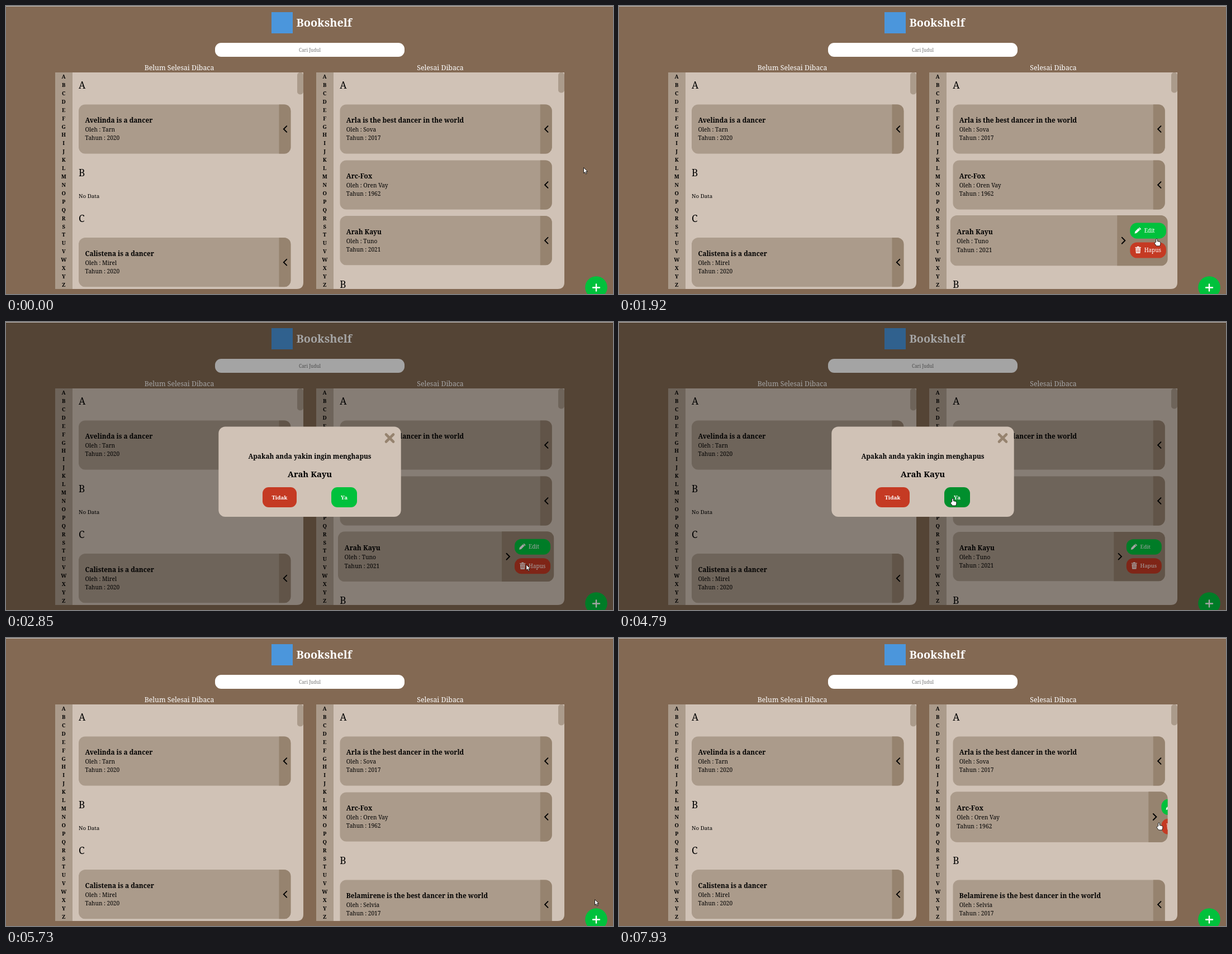
These frames come from a looping animation (1086x516 px, 8000 ms). An HTML page:

```html
<!DOCTYPE html>
<html lang="id">
<head>
<meta charset="utf-8">
<title>Bookshelf</title>
<style>
  html, body { margin: 0; width: 100%; height: 100%; overflow: hidden; background: #836953; }
  svg { display: block; width: 100%; height: 100%; font-family: "Noto Serif", serif; }
</style>
</head>
<body>
<svg id="stage" viewBox="0 0 1086 516"></svg>
<script>
const LOOP = 8000, START = 450, STEP = 135;
const C = {
  wall: '#836953', panel: '#d0c2b6', card: '#ab9b8b', flap: '#96836f',
  green: '#00c13c', greenDark: '#008f2d', red: '#c53a23', redDark: '#9a2c1a'
};

// Where the pointer goes, one eased move after another.
const HOME = { x: 1033, y: 289 };
const MOVES = [
  { from: 400, to: 1120, x: 957, y: 405 },
  { from: 1120, to: 1390, x: 963, y: 416 },
  { from: 1700, to: 2490, x: 941, y: 438 },
  { from: 2650, to: 3550, x: 597, y: 316 },
  { from: 4900, to: 5715, x: 1053, y: 468 },
  { from: 5730, to: 6120, x: 1058, y: 530 },
  { from: 6880, to: 6890, x: 966, y: 427 },
  { from: 6890, to: 7420, x: 966, y: 331 }
];

const within = (t, from, to = LOOP) => t >= from && t < to;
const ease = k => (k = Math.min(1, Math.max(0, k)), k * k * (3 - 2 * k));
const transition = (t, on, off = Infinity, length = 300) =>
  ease((t - on) / length) - ease((t - off) / length);

// Motion is shown in held steps, like a screen recording.
const held = t => Math.max(0, START + Math.floor((t - START) / STEP) * STEP);

const box = (x, y, w, h, fill, r = 0) =>
  `<rect x="${x}" y="${y}" width="${w}" height="${h}" rx="${r}" fill="${fill}"/>`;
const line = (d, color, width) =>
  `<path d="${d}" fill="none" stroke="${color}" stroke-width="${width}" stroke-linecap="round"/>`;
const text = (s, x, y, size, { fill = '#000', bold = false, mid = false } = {}) =>
  `<text x="${x}" y="${y}" font-size="${size}" fill="${fill}"` +
  `${bold ? ' font-weight="700"' : ''}${mid ? ' text-anchor="middle"' : ''}>${s}</text>`;

const DEFS = `<defs>
  <clipPath id="cardClip"><rect width="379.5" height="88.5" rx="12"/></clipPath>
  <clipPath id="panelClip"><rect x="88" y="119" width="911" height="388"/></clipPath>
</defs>`;

function actions(hapusHover) {
  const red = hapusHover ? C.redDark : C.red;
  const pencil = '<path d="M0 11l.8-3.6 5.8-5.8 2.8 2.8-5.8 5.8zM7.3.9q1-1 2 0l1.5 1.5q.7.9-.1 1.7l-.5.5z" fill="#fff"/>';
  const trash = '<path d="M0 1.3h3l.6-1.3h2.8l.6 1.3h3v1.3h-10zM.8 3.4h8.4l-.6 8.6h-7.2z" fill="#fff"/>' +
    line('M3 5v5.3M5 5v5.3M7 5v5.3', red, .8);
  return box(0, 13.3, 63, 27.5, C.green, 12) + box(0, 47.3, 63, 27.5, red, 12) +
    `<g transform="translate(8 21)">${pencil}</g><g transform="translate(9 54.5)">${trash}</g>` +
    text('Edit', 24.7, 30.3, 9.7, { fill: '#fff' }) + text('Hapus', 24.7, 64.3, 9.7, { fill: '#fff' });
}

function card(x, y, [title, author, year], { hover = 0, open = 0, hapusHover = false } = {}) {
  const scale = 1 + .025 * hover, flap = 358.5 - 70.5 * open, dir = open ? -1 : 1;
  return `<g transform="translate(${x + 189.75} ${y + 44.25}) scale(${scale}) translate(-189.75 -44.25)" clip-path="url(#cardClip)">` +
    box(0, 0, 379.5, 88.5, C.card) + box(flap, 0, 380, 88.5, C.flap) +
    text(title, 11.5, 33, 11.8, { bold: true }) +
    text('Oleh : ' + author, 11.5, 48.8, 10.1) + text('Tahun : ' + year, 11.5, 64.2, 10.1) +
    line(`M${flap + 11 + 2.7 * dir} 38.8l${-5.4 * dir} 5.4l${5.4 * dir} 5.4`, '#000', 1.9) +
    (open ? `<g transform="translate(${flap + 22.5} 0)">${actions(hapusHover)}</g>` : '') + '</g>';
}

function panel(x, heading, thumb) {
  const letters = [...'ABCDEFGHIJKLMNOPQRSTUVWXYZ'];
  return `<path d="M${x} 119h444v376q0 12-12 12h-432z" fill="${C.panel}"/>` +
    box(x, 119, 31, 388, C.card) + box(x + 433, 119, 11, thumb, C.card, 5) +
    letters.map((s, i) => text(s, x + 15.2, 130 + i * 14.92, 9.5, { bold: true, mid: true })).join('') +
    text(heading, x + 222, 115.3, 12.3, { fill: '#fff', mid: true });
}

const section = (letter, x, baseline) => text(letter, x, baseline, 17.3);

function books(t) {
  const deleted = t >= 4910, m = held(t);
  const left = 130, right = 597.3;
  const first = {
    hover: transition(m, 750, 900) + transition(m, 7060),
    open: transition(m, 7755, Infinity, 450)
  };
  const second = {
    hover: transition(m, 1060, 2640),
    open: transition(m, 1410, Infinity, 450),
    hapusHover: within(t, 2220, 2850)
  };
  return panel(88, 'Belum Selesai Dibaca', 39.5) + panel(555, 'Selesai Dibaca', deleted ? 37.5 : 36.5) +
    '<g clip-path="url(#panelClip)">' +
    section('A', left, 148.3) + card(left, 176.3, ['Avelinda is a dancer', 'Tarn', 2020]) +
    section('B', left, 305.3) + text('No Data', left, 343.5, 9.8) +
    section('C', left, 387) + card(left, 415, ['Calistena is a dancer', 'Mirel', 2020]) +
    section('A', right, 148.3) + card(right, 176.3, ['Arla is the best dancer in the world', 'Sova', 2017]) +
    card(right, 276.3, ['Arc-Fox', 'Oren Vay', 1962], first) +
    (deleted
      ? section('B', right, 405) + card(right, 433.3, ['Belamirene is the best dancer in the world', 'Selvia', 2017])
      : card(right, 376, ['Arah Kayu', 'Tuno', 2021], second) + section('B', right, 504.5)) +
    '</g>';
}

function dialog(t) {
  const white = { fill: '#fff', bold: true, mid: true };
  return box(0, 0, 1086, 516, 'rgba(0,0,0,.355)') + box(380.3, 187.5, 326.4, 161.5, C.panel, 12) +
    line('M680 201.5l13 13m0-13l-13 13', C.flap, 4.6) +
    text('Apakah anda yakin ingin menghapus', 543.5, 244.5, 11.75, { bold: true, mid: true }) +
    text('Arah Kayu', 543.5, 277.5, 14.9, { bold: true, mid: true }) +
    box(459, 296, 61, 36, C.red, 11) + text('Tidak', 489.5, 317.5, 9.7, white) +
    box(582, 296, 46, 36, within(t, 3700) ? C.greenDark : C.green, 11) + text('Ya', 605, 317.5, 9.7, white);
}

function pointer(t) {
  const { x, y } = MOVES.reduce((p, move) => {
    const k = ease((held(t) - move.from) / (move.to - move.from));
    return { x: p.x + (move.x - p.x) * k, y: p.y + (move.y - p.y) * k };
  }, HOME);
  const hand = within(t, 1250, 2730) || within(t, 3550, 4910) || within(t, 5870, 6900) || within(t, 7160);
  const shape = hand
    ? 'M-1.3 6V.8Q0-.8 1.3.8V4.6l4 .8q1.5.3 1.5 2V10L5.6 13H-.5L-3.8 8.6q-.5-1.8 1-1.5z'
    : 'M.5.5V10.5l2.3-2.1 1.6 3.6 1.7-.8-1.6-3.5h3.1z';
  return `<path d="${shape}" transform="translate(${x} ${y})" fill="#fff" stroke="#111" stroke-width=".9" stroke-linejoin="round"/>`;
}

function scene(t) {
  return DEFS + box(0, 0, 1086, 516, C.wall) +
    box(475, 11, 38, 38, '#4b96dc') +
    text('Bookshelf', 519.5, 36.5, 19.8, { fill: '#fff', bold: true }) +
    box(374, 66, 339, 25, '#fff', 11) +
    text('Cari Judul', 543.5, 81.5, 8.2, { fill: '#757575', mid: true }) +
    books(t) +
    `<circle cx="1056" cy="504" r="19.8" fill="${within(t, 5870, 6390) ? C.greenDark : C.green}"/>` +
    line('M1050 504.5h12m-6-6v12', '#fff', 2.4) +
    (within(t, 2850, 4910) ? dialog(t) : '') +
    box(0, 0, 1086, 1, '#c3bfbc') + pointer(t);
}

const stage = document.getElementById('stage');
function play() {
  stage.innerHTML = scene(performance.now() % LOOP);
  requestAnimationFrame(play);
}
play();
</script>
</body>
</html>
```
